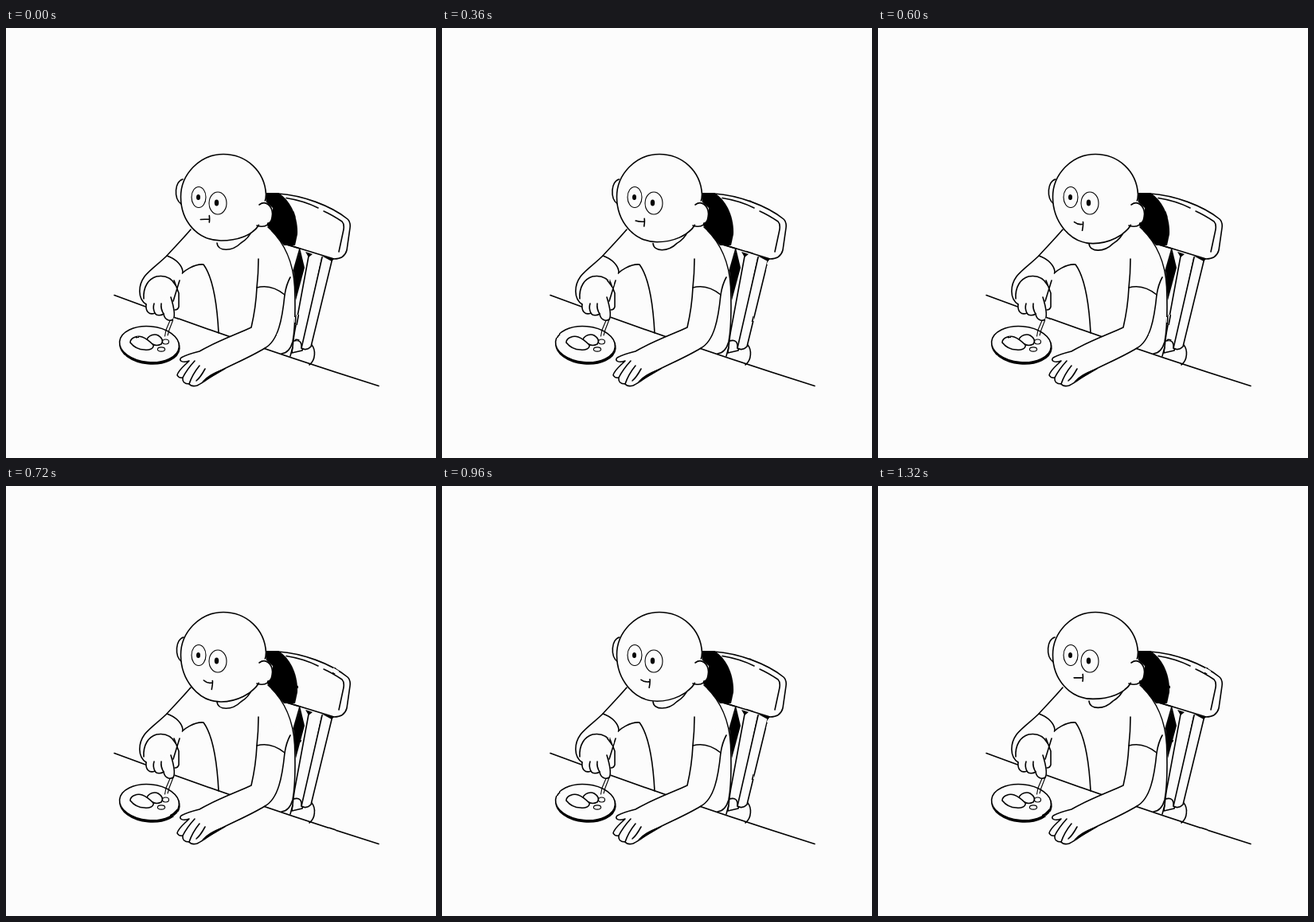
Write an HTML page that moves like this. It is 540 px wide and 540 px high and loops after 1.44 s.

```html
<!DOCTYPE html>
<html lang="en">
<head>
<meta charset="utf-8">
<title>Dinner</title>
<style>
  html, body { margin: 0; width: 100%; height: 100%; overflow: hidden; background: #fcfcfc; }
  svg { display: block; width: 100vw; height: 100vh; }
  .art { fill: none; stroke: #000; stroke-width: 1.6; stroke-linecap: round; stroke-linejoin: round; }
  .paper { fill: #fcfcfc; }
  .ink { fill: #000; }
  .bare { stroke: none; }
  .thin { stroke-width: 1.1; }
</style>
</head>
<body>
<svg viewBox="0 0 540 540">
  <filter id="boil" filterUnits="userSpaceOnUse" x="0" y="0" width="540" height="540" color-interpolation-filters="sRGB">
    <feTurbulence id="noise" type="fractalNoise" baseFrequency="0.045" numOctaves="1" seed="1" result="n"/>
    <feDisplacementMap in="SourceGraphic" in2="n" scale="1.8" xChannelSelector="R" yChannelSelector="G"/>
  </filter>

  <g class="art" filter="url(#boil)">
    <!-- chair -->
    <path class="paper" d="M342 208 C372 210 408 223 429 240 Q433 244 432 251 L428 279 Q425 290 412 290 L350 271 Z"/>
    <path d="M352 213.5 C368 216 382 221 392 226 M399 230 C408 234 416 239 422 243 Q425 246 424 253 L418 281"/>
    <path class="ink bare" d="M326 207 L342 207 C357 216 367 237 366 259 L363 273 L349 273 L328 248 Z"/>
    <path class="ink bare" d="M369.500 278 L375 301 L364 342 L361 305 Z"/>
    <path d="M352 272 L369 277 L361 305"/>
    <path class="paper" d="M380.500 284 L362 384 L359 408 L372 405 L397 288"/>
    <path class="paper" d="M397 288 L371 402 Q377 406 383 400 L409.500 291"/>
    <path class="ink bare" d="M376 281 L385 284 L380 288 Z M396 286 L412 290 L409 293 Z"/>
    <path d="M361 393 Q372 390 371 402 M384 398 C389 404 389 417 381 423 M360 401 L357 412"/>

    <!-- body -->
    <path class="paper bare" d="M232 253 L203 285 L222 306 C232 297 242 296 249 298 C260 315 264 345 267 383 L345 409 L361 390 C365 330 362 290 329 250 Z"/>
    <path d="M329 250 C350 269 361 296 362.500 325 C363.500 352 363 378 360 394 Q356 408 346 409"/>
    <path d="M217 314 C222 304 238 296 248 297 C259 312 265 345 267 383"/>

    <path d="M136 335.500 Q302 397.500 468 449.500"/>

    <!-- resting arm -->
    <path class="paper" d="M317 290 C317 306 316 317 315 326 C314 348 311 363 308 376 C291 384 263 394 243 406 C235 408 225 411 220 414 C216 418 222 421 230 418 C224 424 216 430 215 436 Q217 440 222 439 Q221 447 230 447 Q233 451 240 449 C249 445 256 438 270 430 C290 420 311 411 325 402 C342 393 347 365 350 335 Q352 322 357 313"/>
    <path d="M315 326 Q333 321 350 335"/>
    <path d="M237 418 Q227 429 222 439 M243 424 Q234 435 230 447 M250 428 Q244 439 239 443"/>
    <path class="ink thin" d="M247 444 Q256 434 275 428 Q260 437 247 444 Z"/>

    <!-- plate -->
    <ellipse class="ink" cx="180.500" cy="399.300" rx="37.500" ry="22.500" transform="rotate(5 180 399)"/>
    <ellipse class="paper" cx="180" cy="397.200" rx="37.500" ry="22.500" transform="rotate(5 180 397)"/>
    <path class="paper" d="M177 391 C180 385 187 384 191 386 C196 389 198 393 195 397 Q189 400 184 397"/>
    <path class="paper" d="M156 395 C156 389 165 386 171 388 C177 390 181 394 185 398 C186 403 179 405 174 404 C165 404 160 400 156 395 Z"/>
    <ellipse class="thin" cx="200.500" cy="394" rx="4" ry="3"/>
    <ellipse class="thin" cx="195" cy="403.500" rx="4.600" ry="2.600"/>

    <!-- fork and arm -->
    <path class="thin" d="M207 365 L201 379 L199.500 387 M210 366 L205 379 L203 386"/>
    <path class="paper bare" d="M203 285 L178 308 L167 330 L176 347 L187 359 L210 367 L217 350 L222 310 Z"/>
    <path d="M232 253 C221 266 210 277 202 286 C192 296 181 303 174 312 C166 323 165 340 176 347"/>
    <path d="M202 286 C214 290 222 299 222 307"/>
    <path d="M173 340 C172 325 179 315 189 312 C200 310 208 314 213 323"/>
    <path class="paper" d="M176 347 C175 356 180 361 187 358 C189 362 195 361 198 359 C199 366 205 369 210 366 C213 361 211 351 207 338"/>
    <path d="M187 358 Q184 352 186 346 M198 359 Q194 353 195 346"/>
    <path d="M218 317 L210 343 M211 317 L217 333 L217 350 Q216 354 212 354"/>

    <!-- head -->
    <path id="neck" d="M265 270 C266 281 284 281 295 270 Q305 264 309 254"/>
    <path id="earL" class="paper" d="M222 190 C212 192 210 214 220 221"/>
    <path id="skull" class="paper"/>
    <path class="paper bare" d="M317 223 L325 217 L335 226 L333 243 L318 248 Z"/>
    <path d="M318 222 C326 216 334 223 334.500 233 C335 246 325 252 315 248"/>
    <g class="thin">
      <ellipse cx="242" cy="212.500" rx="9" ry="13"/>
      <ellipse cx="266" cy="220" rx="11" ry="14"/>
    </g>
    <ellipse class="ink bare" cx="241.500" cy="212.500" rx="2.500" ry="3.600"/>
    <ellipse class="ink bare" cx="264.500" cy="219.500" rx="2.700" ry="3.900"/>
    <path id="mouth"/>
  </g>
</svg>
<script>
  const STEP = 120, COUNT = 12, LOOKS = 5;
  const get = id => document.getElementById(id);
  const [noise, neck, earL, skull, mouth] = ['noise', 'neck', 'earL', 'skull', 'mouth'].map(get);

  // Cosine over one loop, peaking at the given time in ms
  const wave = (t, peak) => Math.cos(2 * Math.PI * (t - peak) / (STEP * COUNT));

  function pose(i) {
    const t = i * STEP;
    const drop = (1 - wave(t, 30)) / 2;
    const x = 257.3 - 3.7 * wave(t, 230);
    const y = 240 + 7 * drop;
    const chin = 267 + 4 * drop;

    noise.setAttribute('seed', 3 + i % LOOKS * 7);
    neck.setAttribute('transform', `translate(0 ${drop})`);
    earL.setAttribute('transform', `translate(${drop})`);
    skull.setAttribute('d',
      `M325 218 Q326.500 214 326.500 209 C325 180 302 158.500 273 158.500 C243 158.500 219.500 184 219.500 212
       C219.500 243 241 ${chin} 270 ${chin} C290 ${chin} 309 261 318 247`);
    mouth.setAttribute('d',
      `M${x - 11} ${y + 0.5 - 3.5 * drop} Q${x - 6} ${y + 1.5 * drop} ${x} ${y}
       M${x} ${y - 4.5 + 2 * drop} Q${x + 0.6} ${y} ${x - drop} ${y + 4 + 4.5 * drop}`);
  }

  let last = -1;
  function tick() {
    const i = Math.floor(performance.now() / STEP) % COUNT;
    if (i !== last) pose(last = i);
    requestAnimationFrame(tick);
  }
  tick();
</script>
</body>
</html>
```
